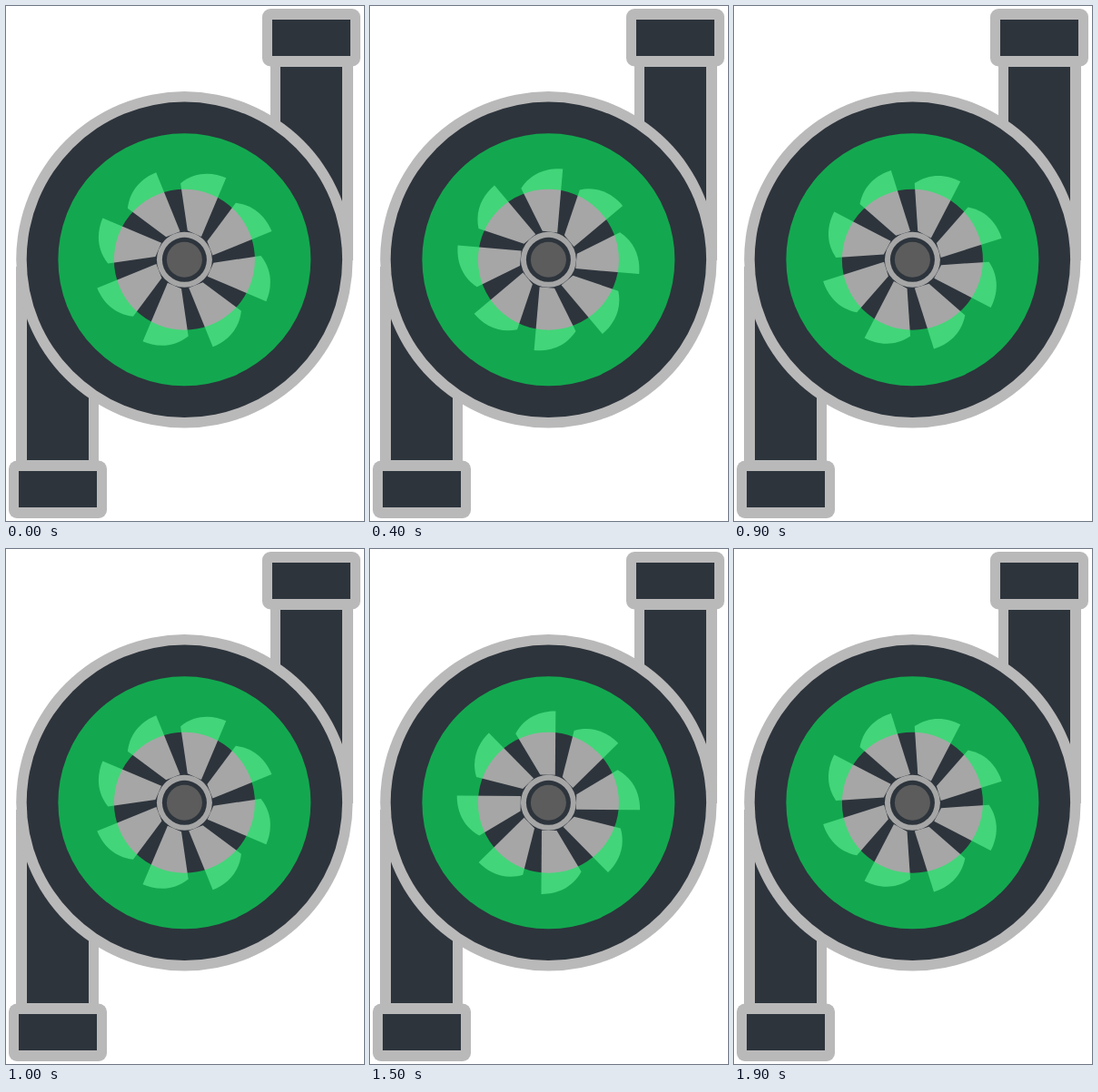
An HTML page for the animation above (2000 ms loop, 394x567 px).

```html
<!DOCTYPE html>
<html lang="en">
<head>
<meta charset="utf-8">
<title>Turbocharger</title>
<style>
  html, body { margin: 0; width: 100%; height: 100%; overflow: hidden; background: #fff; }
  svg { display: block; }
  .rim { fill: #bab9b9; }
  .body { fill: #2d343c; }
</style>
</head>
<body>
<svg width="394" height="567" viewBox="0 0 394 567">
  <defs>
    <g id="pipe">
      <rect class="rim" x="291" y="60" width="91" height="220"/>
      <rect class="body" x="302" y="67" width="68" height="200"/>
      <rect class="rim" x="282" y="3" width="108" height="63.5" rx="9"/>
      <rect class="body" x="293" y="15" width="86" height="40"/>
    </g>
    <path id="blade" d="M5-31 L0-101 C-15-100 -33-93 -42-73 L-11.5-30Z"/>
  </defs>

  <use href="#pipe"/>
  <use href="#pipe" transform="rotate(180 196.5 283.5)"/>

  <g transform="translate(196.4 279.3)">
    <circle class="rim" r="185.2"/>
    <circle class="body" r="173.7"/>
    <g id="rotor" fill="#a6a6a6"></g>
    <circle r="30.5" fill="#a6a6a6"/>
    <circle class="body" r="24.5"/>
    <circle r="19.5" fill="#5c5c5c"/>
    <!-- translucent ring tints the blade tips -->
    <circle r="108.25" fill="none" stroke="rgb(2 245 93)" stroke-opacity=".6" stroke-width="61.5"/>
  </g>
</svg>
<script>
  const BLADES = 8, STEP_MS = 100, STEP_DEG = -4.5, START_DEG = 27, LOOP_MS = 2000;
  const rotor = document.getElementById('rotor');

  rotor.innerHTML = Array.from({ length: BLADES }, (_, i) =>
    `<use href="#blade" transform="rotate(${i * 360 / BLADES})"/>`).join('');

  function draw() {
    const step = Math.floor(performance.now() % LOOP_MS / STEP_MS);
    rotor.setAttribute('transform', `rotate(${START_DEG + step * STEP_DEG})`);
    requestAnimationFrame(draw);
  }
  draw();
</script>
</body>
</html>
```
